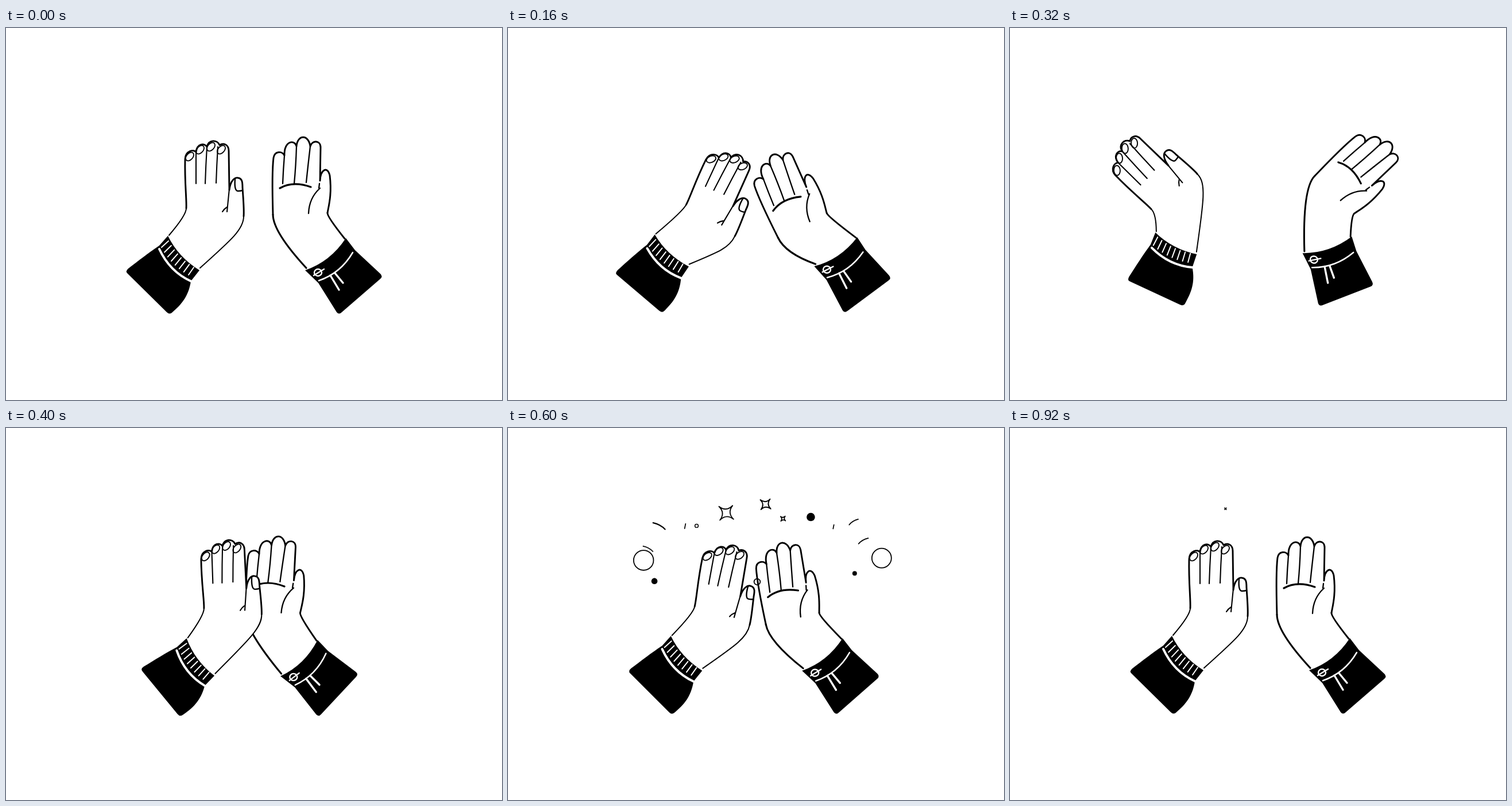
An HTML page with a canvas for the animation above (0.96 s loop, 864 px wide and 648 px high).

```html
<!DOCTYPE html>
<html lang="en">
<head>
<meta charset="utf-8">
<title>Clapping hands</title>
<style>
  html, body { margin: 0; height: 100%; overflow: hidden; background: #fff; }
  canvas { display: block; }
</style>
</head>
<body>
<canvas id="stage" width="864" height="648"></canvas>
<script>
const ctx = document.getElementById('stage').getContext('2d');
const LOOP = 960, STEP = 40, RAD = Math.PI / 180;

// time, x of left and right elbow, inward turn of both sleeves and both hands
const POSES = [
  [0, 247.5, 617, 0, 0],
  [160, 228.5, 626, -4.2, 25],
  [320, 254, 585.5, -19.7, -45.3],
  [400, 270, 578, 6, -2],
  [480, 265, 582.5, 2.2, 12.3],
  [600, 248.5, 608.5, 0.4, 10.4],
  [740, 247.5, 617, 0, 0]
];
const LEFT = { col: 1, side: 1, elbowY: 460.5, wrist: [313, 322], reach: 65.5, lift: 0.3 };
const RIGHT = { col: 2, side: -1, elbowY: 465, wrist: [560, 326], reach: 57, lift: 0 };

const mix = (a, b, s) => a + (b - a) * s;
const clamp = s => Math.min(1, Math.max(0, s));

// Smooth curve through one column of the poses, at rest at both ends.
function track(col, t) {
  const last = POSES.length - 1, at = k => POSES[k][0], v = k => POSES[k][col];
  if (t >= at(last)) return v(last);
  let i = 0;
  while (t >= at(i + 1)) i++;
  const slope = k => k === 0 || k === last ? 0 : (v(k + 1) - v(k - 1)) / (at(k + 1) - at(k - 1));
  const h = at(i + 1) - at(i), s = (t - at(i)) / h, s2 = s * s, s3 = s2 * s;
  return mix(v(i), v(i + 1), 3 * s2 - 2 * s3) +
    h * (slope(i) * (s3 - 2 * s2 + s) + slope(i + 1) * (s3 - s2));
}

const turnAt = (from, x, y, deg) =>
  new DOMMatrix().translate(x, y).rotate(deg).translate(-from[0], -from[1]);

function pose(arm, t) {
  const { side, wrist } = arm;
  const x = track(arm.col, t), sleeve = track(3, t), bend = track(4, t);
  // The wrist swings over the elbow with the sleeve and the hand.
  const wx = x + side * (arm.reach + 1.7 * sleeve + 0.77 * bend);
  const wy = wrist[1] - arm.lift * Math.max(0, bend);
  const cuff = turnAt([POSES[0][arm.col], arm.elbowY], x, arm.elbowY, side * sleeve);
  const hand = turnAt(wrist, wx, wy, side * bend);
  const toHand = hand.inverse().multiply(cuff);
  const link = (px, py) => {
    const p = toHand.transformPoint(new DOMPoint(px, py));
    return [p.x, p.y];
  };
  return { cuff, hand, link };
}

function line(d, width, color = '#000') {
  ctx.lineWidth = width;
  ctx.strokeStyle = color;
  ctx.stroke(new Path2D(d));
}

function fill(d, color = '#000') {
  ctx.fillStyle = color;
  ctx.fill(new Path2D(d));
}

const L_HAND = 'C315,300 311,270 312,228 C313,214 326,211 331,216 C333,201 346,200 350,207 ' +
  'C353,194 368,194 372,204 C380,199 388,204 388,214 L389,282 C391,266 398,260 404,261 ' +
  'C412,262 412,270 412,278 C413,295 415,315 414,328';
const L_LINES = 'M331,216 L331,271 M350,207 Q348,240 347,271 M369,207 Q367,240 366,270 ' +
  'M389,280 Q387,300 385,320 M385,312 Q380,315 377,320';
const L_THUMBNAIL = 'M399,263 C398,275 399,284 404,284 Q408,284 412,283';
const L_NAILS = [[320, 224], [338, 212], [357, 207], [375, 212]];
const L_SLEEVE = 'M213,419 C230,406 249,391 267,379 L282,362 Q300,399 337,422 L322,441 ' +
  'C318,468 305,482 290,495 Q285,500 280,495 L212,428 Q207,424 213,419Z';

const R_HAND = 'C464,290 463,250 466,226 C468,214 481,214 485,222 C484,196 503,194 506,206 ' +
  'C508,185 527,185 530,206 C533,195 548,195 548,208 L547,266 C548,246 560,240 564,257 ' +
  'C568,290 562,310 560,322';
const R_LINES = 'M485,222 Q483,246 482,271 M506,206 Q505,240 502,271 M530,206 Q526,240 523,269 ' +
  'M546,271 L545,279 M547,279 Q528,296 527,323';
const R_SLEEVE = 'M592,366 L608,387 L652,428 Q657,433 652,437 L585,495 Q580,500 576,495 ' +
  'L544,444 L521,422 Q565,407 592,366Z';

function leftArm(t) {
  const { cuff, hand, link } = pose(LEFT, t);
  const end = link(338, 418);
  const upper = `M${link(284, 361)} Q314,326 314,314 `;
  const lower = `C414,350 ${mix(414, end[0], 0.25)},${mix(350, end[1], 0.25)} ${end}`;
  ctx.setTransform(hand);
  fill(upper + L_HAND + lower + 'Z', '#fff');
  line(upper, 2);
  line('M414,328 ' + lower, 2);
  line('M314,314 ' + L_HAND, 2.9);
  line(L_LINES, 2.1);
  line(L_THUMBNAIL, 2.4);
  ctx.lineWidth = 1.9;
  for (const [x, y] of L_NAILS) {
    ctx.beginPath();
    ctx.ellipse(x, y, 5.5, 8.6, 42 * RAD, 0, 7);
    ctx.stroke();
  }

  ctx.setTransform(cuff);
  fill(L_SLEEVE);
  line('M267,385 Q285,424 322,441', 4, '#fff');
  // Ribs run between two curves along the band.
  const quad = (p, q, r, s) => mix(mix(p, q, s), mix(q, r, s), s);
  let ribs = '';
  for (let s = 0; s < 1.01; s += 1 / 7) {
    ribs += `M${quad(283, 299, 327, s)},${quad(371, 400, 417, s)} ` +
      `L${quad(271, 288, 318, s)},${quad(382, 413, 430, s)} `;
  }
  line(ribs, 2, '#fff');
}

function rightArm(t) {
  const { cuff, hand, link } = pose(RIGHT, t);
  const outer = `M${link(523, 418)} Q465,355 465,325 `;
  const inner = `Q559,328 ${link(590, 367)}`;
  ctx.setTransform(hand);
  fill(outer + R_HAND + inner + 'Z', '#fff');
  line(outer, 3.1);
  line('M465,325 ' + R_HAND, 2.9);
  line('M560,322 ' + inner, 2.9);
  line(R_LINES, 2.3);
  line('M477,279 Q500,266 531,277', 3.2);

  ctx.setTransform(cuff);
  fill(R_SLEEVE);
  line('M545,440 Q583,427 604,391', 2.5, '#fff');
  line('M565,431 L580,456 M573,427 L587,444', 3.4, '#fff');
  line('M537,426 a6.5,6 0 1,0 13,0 a6.5,6 0 1,0 -13,0 M536,431 L554,420', 2.4, '#fff');
}

// kind, resting place, size, time of vanishing
const BITS = [
  ['ring', 226, 230, 17.6, 880],
  ['ring', 320, 165.5, 3, 846],
  ['ring', 661, 226, 17.2, 920],
  ['ring', 434, 277, 5.5, 815],
  ['star', 375, 140, 17, 940],
  ['star', 450, 124, 12.5, 812],
  ['star', 484, 150, 5.8, 853],
  ['dot', 535, 149, 10.3, 790],
  ['dot', 614, 254, 5.6, 790],
  ['dot', 245, 268, 8, 760],
  ['dash', 308.5, 162, 10, 660],
  ['dash', 567, 163, 5, 780]
];

// One curl, drawn towards its end at 0,0, and where its copies stand
const CURL = new Path2D('M55,43 C48,24 26,22 25,34 C26,44 42,34 38,23 C34,11 20,0 0,0');
const CURL_LENGTH = 128;
const CURLS = [[242, 164, 1, 1], [227, 205, 0.8, 0.8], [618, 158, -0.75, 0.85], [636, 191, -0.8, 0.85]];

function star(x, y, r, turn) {
  ctx.beginPath();
  for (let k = 0; k <= 4; k++) {
    const a = turn + k * Math.PI / 2, m = a - Math.PI / 4, c = r * 0.08;
    const px = x + r * Math.cos(a), py = y + r * Math.sin(a);
    if (k) ctx.quadraticCurveTo(x + c * Math.cos(m), y + c * Math.sin(m), px, py);
    else ctx.moveTo(px, py);
  }
  ctx.closePath();
  ctx.stroke();
}

function burst(t) {
  const age = t - 480, left = Math.exp(-age / 123);
  if (t <= 400 || t >= 940) return;
  ctx.setTransform(1, 0, 0, 1, 0, 0);
  ctx.strokeStyle = ctx.fillStyle = '#000';
  for (const [kind, endX, endY, size, end] of BITS) {
    const power = kind === 'dot' || kind === 'dash' ? 1.3 : 3.4;
    const r = size * clamp((t - 400) / 80) * (1 - clamp(age / (end - 480)) ** power);
    if (r < 0.1) continue;
    // Everything flies out from between the palms; dashes rise.
    const a = kind === 'dash' ? -Math.PI / 2 : Math.atan2(endY - 240, endX - 434);
    const x = endX - 27 * left * Math.cos(a), y = endY - 24 * left * Math.sin(a);
    ctx.lineWidth = Math.min(1.8, r * 0.5);
    if (kind === 'star') {
      star(x, y, r, (5 + age * 0.3) * RAD);
    } else if (kind === 'dash') {
      line(`M${x + r * 0.2},${y - r} L${x - r * 0.2},${y + r}`, 1.7);
    } else {
      ctx.beginPath();
      ctx.arc(x, y, r, 0, 7);
      kind === 'dot' ? ctx.fill() : ctx.stroke();
    }
  }

  // A shrinking piece of each curl slides to its end.
  const tail = clamp(1 - left), head = clamp(1 - left / 2);
  ctx.lineWidth = 2.2 * Math.min(1, left * 10);
  ctx.setLineDash([(head - tail) * CURL_LENGTH, 999]);
  ctx.lineDashOffset = -tail * CURL_LENGTH;
  for (const [x, y, sx, sy] of CURLS) {
    ctx.setTransform(sx, 0, 0, sy, x, y);
    ctx.stroke(CURL);
  }
  ctx.setLineDash([]);
}

function draw(now) {
  const t = Math.floor((now % LOOP) / STEP) * STEP;
  ctx.setTransform(1, 0, 0, 1, 0, 0);
  ctx.fillStyle = '#fff';
  ctx.fillRect(0, 0, 864, 648);
  ctx.lineCap = ctx.lineJoin = 'round';
  rightArm(t);
  burst(t);
  leftArm(t);
}

const start = performance.now();
function tick() {
  draw(performance.now() - start);
  requestAnimationFrame(tick);
}
tick();
</script>
</body>
</html>
```
